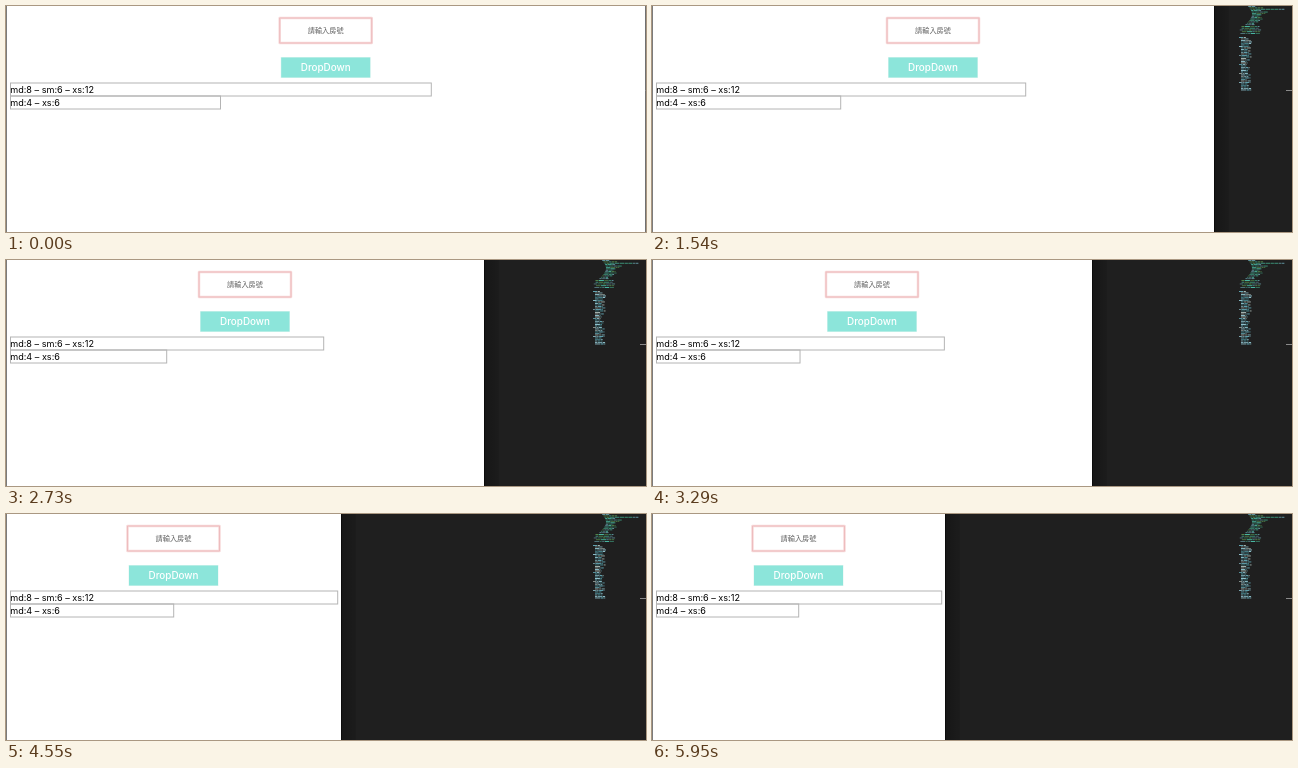
Animation, 640 px wide and 226 px high, one loop 8.12 s. Source, as an HTML page with a canvas:

```html
<!DOCTYPE html>
<html lang="zh-Hant">
<head>
<meta charset="utf-8">
<title>Responsive grid</title>
<style>
  html, body { margin: 0; width: 100%; height: 100%; overflow: hidden; background: #fff; }
  canvas { display: block; width: 640px; height: 226px; }
</style>
</head>
<body>
<canvas id="stage"></canvas>
<script>
const STAGE_W = 640, STAGE_H = 226;
const LOOP = 8120, TICK = 70;
const MD = 437, SM = 342;

// Key points of the drag: time in ms, window width.
const DRAG = [
  [840, 639.4], [1260, 603], [1540, 562], [2730, 478],
  [3850, 402], [4550, 335], [5250, 305], [5950, 293]
];

const canvas = document.getElementById('stage');
const dpr = window.devicePixelRatio || 1;
canvas.width = STAGE_W * dpr;
canvas.height = STAGE_H * dpr;
const ctx = canvas.getContext('2d');
ctx.scale(dpr, dpr);

function windowWidth(time) {
  if (time <= DRAG[0][0]) return DRAG[0][1];
  const next = DRAG.findIndex(([t]) => time <= t);
  if (next < 0) return DRAG[DRAG.length - 1][1];
  const [t0, w0] = DRAG[next - 1], [t1, w1] = DRAG[next];
  return Math.round(w0 + (w1 - w0) * (time - t0) / (t1 - t0));
}

function fill(color, x, y, w, h) {
  ctx.fillStyle = color;
  ctx.fillRect(x, y, w, h);
}

function stroke(color, lineWidth, x, y, w, h) {
  ctx.strokeStyle = color;
  ctx.lineWidth = lineWidth;
  ctx.strokeRect(x, y, w, h);
}

function text(str, x, y, font, color, align = 'left') {
  ctx.font = font;
  ctx.fillStyle = color;
  ctx.textAlign = align;
  ctx.fillText(str, x, y);
}

function seeded(seed) {
  return () => (seed = (seed * 16807) % 2147483647) / 2147483647;
}

// A row of short strokes in random code colours.
function codeLine(x, length, y, colors, rand) {
  const end = x + length;
  while (x < end) {
    const w = Math.min(1.5 + rand() * 4, end - x);
    ctx.globalAlpha = 0.6 + rand() * 0.4;
    fill(colors[Math.floor(rand() * colors.length)], x, y, w, 0.9);
    x += w + 0.5;
  }
  ctx.globalAlpha = 1;
}

function drawMinimap() {
  const rand = seeded(41);
  const code = ['#3f9d80', '#4ec9b0', '#5f9a52', '#6aa3b0'];
  const style = ['#6fc0d0', '#9cd5e2', '#57adb8', '#b9c9c4'];
  for (let i = 0; i < 14; i++) {
    const nesting = Math.sin(Math.PI * (i + 3) / 17);
    const length = i === 2 ? 34 : 7 + rand() * 12 * nesting;
    codeLine(592 + 8 * nesting, length, i * 1.4, code, rand);
  }
  for (let y = 20; y < 28; y += 1.75) {
    codeLine(587 + rand() * 3, 15 + rand() * 8, y, code, rand);
  }
  for (let i = 0; i < 36; i++) {
    const heading = i % 6 === 0;
    codeLine(heading ? 587 : 589, (heading ? 7 : 5) + rand() * 6, 31 + i * 1.5, style, rand);
  }
  fill('#8a8a8a', 634, 84, 6, 1);
}

function drawEditor(w) {
  fill('#1f1f1f', 0, 0, STAGE_W, STAGE_H);
  drawMinimap();
  const shade = ctx.createLinearGradient(w, 0, w + 15, 0);
  shade.addColorStop(0, 'rgba(0,0,0,.28)');
  shade.addColorStop(1, 'rgba(0,0,0,.1)');
  fill(shade, w, 0, 15, STAGE_H);
  fill('#0c0c0c', w, 0, 1, STAGE_H);
}

function drawInput(cx) {
  ctx.lineJoin = 'round';
  stroke('#f7d9d9', 2.5, cx - 46, 12, 92, 25);
  stroke('#edb9bb', 0.9, cx - 46, 12, 92, 25);
  text('請輸入房號', cx, 24.2, '7.2px "Noto Sans CJK TC", "Noto Sans CJK", sans-serif', '#606060', 'center');
}

function drawButton(cx) {
  fill('#e2f5f2', cx - 45, 51, 90, 21);
  fill('#8ce5da', cx - 44.5, 51.5, 89, 20);
  text('DropDown', cx, 62.4, '500 9.9px Inter, sans-serif', '#fff', 'center');
}

function drawColumn(label, y, w) {
  ctx.lineJoin = 'miter';
  stroke('#b4b4b4', 1, 4.5, y, w - 0.8, 13);
  text(label, 4.2, y + 7, '9.1px Inter, sans-serif', '#000');
}

function drawPage(w) {
  fill('#fff', 0, 0, w, STAGE_H);
  fill('#7c7c7c', 0, 0, 1, STAGE_H);
  drawInput(w / 2);
  drawButton(w / 2);
  const spans = w >= MD ? [8, 4] : w >= SM ? [6, 6] : [12, 6];
  const unit = (w - 7) / 12;
  drawColumn('md:8 – sm:6 – xs:12', 77, spans[0] * unit);
  drawColumn('md:4 – xs:6', 90, spans[1] * unit);
}

function frame() {
  const time = performance.now() % LOOP;
  const w = windowWidth(Math.floor(time / TICK) * TICK);
  ctx.textBaseline = 'middle';
  drawEditor(w);
  drawPage(w);
  requestAnimationFrame(frame);
}

frame();
</script>
</body>
</html>
```
